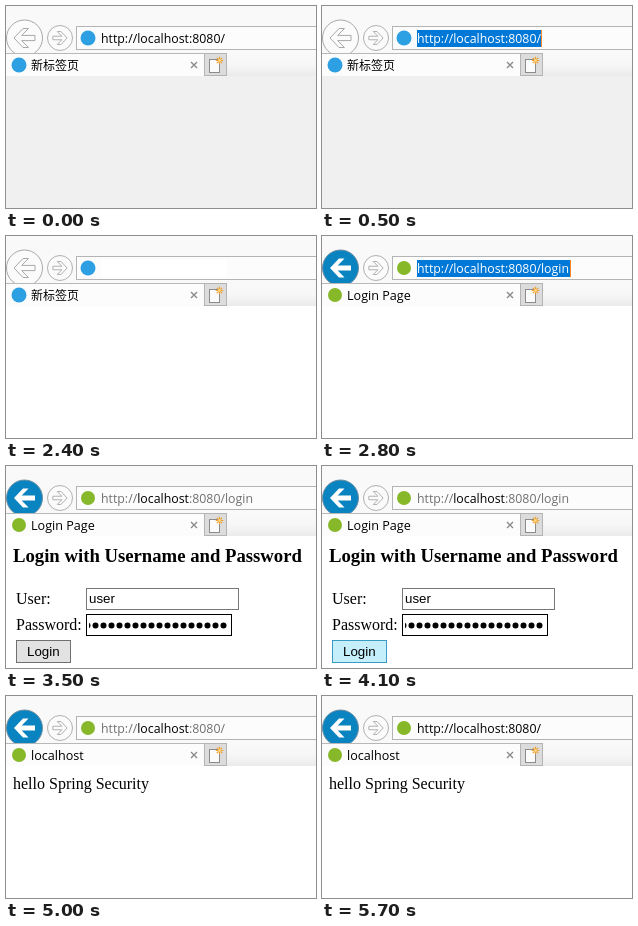
An HTML page with a canvas for the animation above (6 s loop, 310 by 202 pixels).

```html
<!DOCTYPE html>
<html lang="en">
<head>
<meta charset="utf-8">
<title>Login in the browser</title>
<style>
html, body { margin: 0; width: 100%; height: 100%; overflow: hidden; background: #fff; }
canvas { display: block; width: 310px; height: 202px; }
</style>
</head>
<body>
<canvas id="stage"></canvas>
<script>
const W = 310, H = 202, LOOP = 6000;
const canvas = document.getElementById('stage');
const ctx = canvas.getContext('2d');
const dpr = window.devicePixelRatio || 1;
canvas.width = W * dpr;
canvas.height = H * dpr;
ctx.scale(dpr, dpr);

const UI = '"Open Sans", "Noto Sans", sans-serif';
const CJK = '12px "Noto Sans CJK SC", "Noto Sans CJK", sans-serif';
const SERIF = '"Liberation Serif", "Times New Roman", serif';
const FIELD = '13.33px "Liberation Sans", Arial, sans-serif';
const URL_FONT = '12.35px ' + UI;
const TAB_FONT = '12.6px ' + UI;
const BLUE = '#2d9fe3', GREEN = '#86b82a';

function rect(x, y, w, h, fill) {
  ctx.fillStyle = fill;
  ctx.fillRect(x, y, w, h);
}

function box(x, y, w, h, fill, line) {
  rect(x, y, w, h, line);
  rect(x + 1, y + 1, w - 2, h - 2, fill);
}

function text(str, x, y, font, fill = '#000') {
  ctx.font = font;
  ctx.fillStyle = fill;
  ctx.fillText(str, x, y);
  return x + ctx.measureText(str).width;
}

function disc(x, y, r, fill, line) {
  ctx.beginPath();
  ctx.arc(x, y, r, 0, Math.PI * 2);
  ctx.fillStyle = fill;
  ctx.fill();
  if (line) {
    ctx.strokeStyle = line;
    ctx.lineWidth = 1;
    ctx.stroke();
  }
}

// Arrow pointing left; dir = -1 mirrors it.
function arrow(cx, cy, size, dir, fill, line) {
  const points = [[-10.5, 0], [-1.5, -9.5], [4, -9.5], [-2.8, -2.6], [10.5, -2.6],
    [10.5, 2.6], [-2.8, 2.6], [4, 9.5], [-1.5, 9.5]];
  ctx.beginPath();
  for (const [x, y] of points) ctx.lineTo(cx + x * size * dir, cy + y * size);
  ctx.closePath();
  if (fill) {
    ctx.fillStyle = fill;
    ctx.fill();
  }
  if (line) {
    ctx.strokeStyle = line;
    ctx.lineWidth = 1;
    ctx.stroke();
  }
}

function navButtons(active) {
  if (active) {
    disc(18.5, 32, 18, '#0a84c1', '#6f8fa3');
    arrow(18.5, 32, 1, 1, '#fff');
  } else {
    disc(18.5, 32, 18, '#fbfbfb', '#a8a8a8');
    arrow(18.5, 32, 1, 1, null, '#a8a8a8');
  }
  disc(54, 32, 12.5, '#fbfbfb', '#b0b0b0');
  arrow(54, 32, 0.68, -1, null, '#b0b0b0');
}

function newTabButton() {
  box(198, 47, 23, 23, '#dcdcdc', '#b4b4b4');
  box(203, 53, 11, 14, '#fbfbfb', '#8c8c8c');
  ctx.strokeStyle = '#f0a030';
  ctx.lineWidth = 1.2;
  ctx.beginPath();
  for (let i = 0; i < 4; i++) {
    const a = i * Math.PI / 4, x = Math.cos(a) * 3.8, y = Math.sin(a) * 3.8;
    ctx.moveTo(213.5 - x, 54.5 - y);
    ctx.lineTo(213.5 + x, 54.5 + y);
  }
  ctx.stroke();
  disc(213.5, 54.5, 1.4, '#ffd982');
}

function tabRow(s) {
  const shade = ctx.createLinearGradient(0, 47, 0, 70);
  shade.addColorStop(0, '#f9f9f9');
  shade.addColorStop(0.5, '#f7f7f7');
  shade.addColorStop(1, '#ebebeb');
  rect(0, 47, W, 23, shade);
  rect(0, 47, 198, 23, '#fcfcfc');
  rect(0, 47, 198, 1, '#b8b8b8');
  disc(13, 59, s.leaf ? 7 : 7.5, s.leaf ? GREEN : BLUE);
  text(s.title, 25, s.title === '新标签页' ? 63.5 : 64, s.title === '新标签页' ? CJK : TAB_FONT);
  ctx.strokeStyle = '#8a8a8a';
  ctx.lineWidth = 1.4;
  ctx.beginPath();
  ctx.moveTo(185, 56); ctx.lineTo(191, 62);
  ctx.moveTo(191, 56); ctx.lineTo(185, 62);
  ctx.stroke();
  newTabButton();
}

function addressBar(s) {
  box(70, 20, W, 24, '#fcfcfc', '#b4b4b4');
  disc(82, 32, s.leaf ? 7 : 7.5, s.leaf ? GREEN : BLUE);
  const end = s.path === '/login' ? 249 : 220;
  if (s.mode === 'blank') {
    rect(95, 24, 125, 17, '#fff');
    return;
  }
  const selected = s.mode === 'selected';
  if (selected) rect(95, 24, end - 95, 17, '#0078d7');
  const main = selected ? '#fff' : '#000';
  const dim = s.mode === 'dim' ? '#707070' : main;
  let x = text('http://', 95, 37, URL_FONT, dim);
  x = text('localhost', x, 37, URL_FONT, main);
  text(':8080' + s.path, x, 37, URL_FONT, dim);
  if (s.caret) {
    if (selected) rect(end - 1, 24, 1, 17, '#ff8728');
    else rect(95, 24, 1, 17, '#000');
  }
}

function passwordDots() {
  ctx.save();
  ctx.beginPath();
  ctx.rect(83, 149, 140, 20);
  ctx.clip();
  for (let i = -1; i < 17; i++) disc(89.5 + i * 8, 159.5, 3, '#000');
  ctx.restore();
}

function loginForm(s) {
  text('Login with Username and Password', 7, 96, 'bold 18.72px ' + SERIF);
  text('User:', 10, 138, '16px ' + SERIF);
  text('Password:', 10, 164, '16px ' + SERIF);
  box(80, 122, 153, 22, '#fff', s.userHover ? '#202020' : '#777');
  box(80, 148, 146, 22, '#fff', s.focus ? '#000' : s.filled ? '#4a4a4a' : '#777');
  if (s.filled) {
    text('user', 83, 137, FIELD);
    passwordDots();
  }
  const [fill, line] = {
    rest: ['#e2e2e2', '#707070'],
    hover: ['#c4effb', '#3a9cc4'],
    press: ['#a2f3ff', '#2a93bd']
  }[s.button];
  box(10, 174, 55, 23, fill, line);
  text('Login', 21, 190, FIELD);
}

// Each step changes only the listed parts of the state.
const steps = [
  [0, { page: 'new', mode: 'plain', path: '/', title: '新标签页', button: 'rest' }],
  [400, { mode: 'selected' }],
  [500, { caret: true }],
  [800, { mode: 'plain', caret: false }],
  [900, { caret: true }],
  [2400, { mode: 'blank', caret: false, page: 'empty' }],
  [2500, { back: true }],
  [2600, { mode: 'plain', title: 'localhost' }],
  [2800, { leaf: true, title: 'Login Page', path: '/login', mode: 'selected', caret: true }],
  [2900, { page: 'form' }],
  [3100, { caret: false }],
  [3500, { mode: 'dim', filled: true, focus: true }],
  [3700, { userHover: true }],
  [3900, { userHover: false }],
  [4100, { button: 'hover' }],
  [4700, { focus: false }],
  [4800, { button: 'press' }],
  [4900, { page: 'empty' }],
  [5000, { page: 'hello', path: '/', title: 'localhost' }],
  [5700, { mode: 'plain' }]
];

function stateAt(t) {
  const s = {};
  for (const [at, change] of steps) if (t >= at) Object.assign(s, change);
  return s;
}

function draw() {
  const s = stateAt(performance.now() % LOOP);
  rect(0, 0, W, H, '#f9f9f9');
  navButtons(s.back);
  addressBar(s);
  tabRow(s);
  rect(0, 70, W, H - 70, s.page === 'new' ? '#f0f0f0' : '#fff');
  if (s.page === 'form') loginForm(s);
  if (s.page === 'hello') text('hello Spring Security', 7, 93, '16px ' + SERIF);
  requestAnimationFrame(draw);
}
draw();
</script>
</body>
</html>
```
